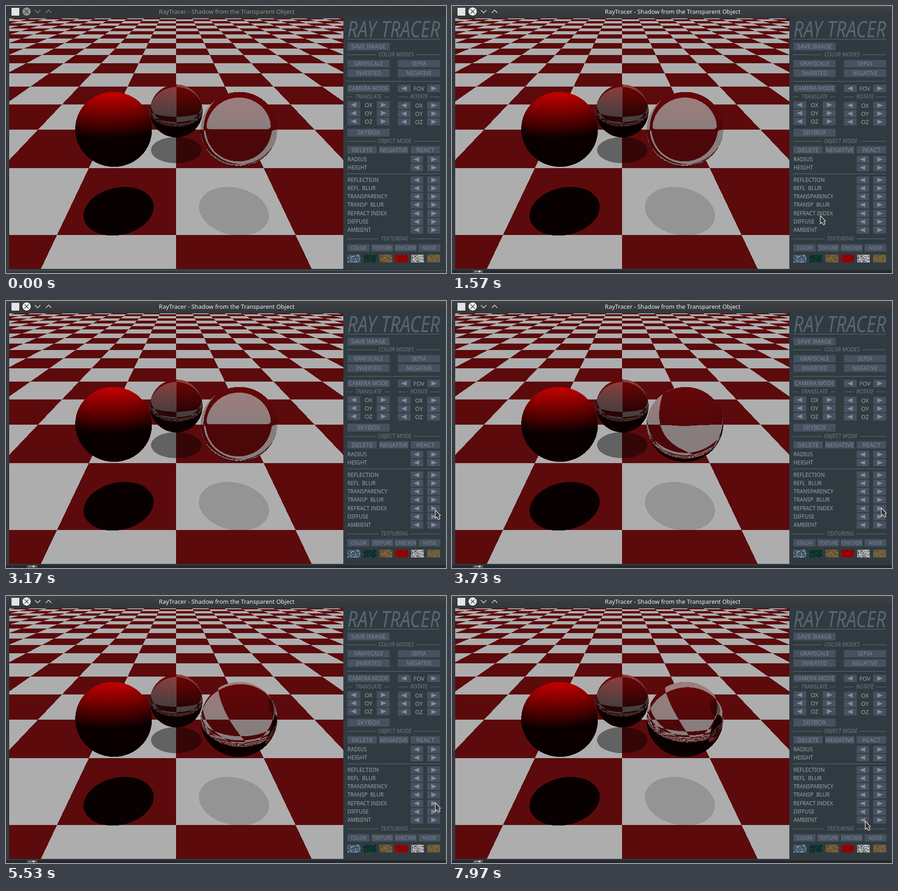
An HTML page with a canvas that plays this animation: 960x583 px, repeating every 8000 ms.

```html
<!DOCTYPE html>
<html lang="en">
<head>
<meta charset="utf-8">
<title>Ray tracer</title>
<style>
html, body { margin: 0; width: 100%; height: 100%; overflow: hidden; background: #31373c; }
canvas { display: block; }
</style>
</head>
<body>
<canvas id="stage" width="960" height="583"></canvas>
<script>
const LOOP = 8000, FONT = '"Noto Sans", "Open Sans", sans-serif';
const stage = document.getElementById('stage').getContext('2d');

function layer(w, h) {
  const c = document.createElement('canvas');
  c.width = w;
  c.height = h;
  return c.getContext('2d');
}

// ---- Ray-traced scene: unit floor tiles, parallel light, one radius for all balls ----
const R = 0.321, FOCAL = 626.5, COS = 0.8745, SIN = 0.4851;
const EYE = [0, 1.8384, -1.735], LIGHT = [0, 0.9724, 0.2334];
const balls = [
  { c: [-0.534, 0.738, 0.499], clear: 0, red: 185, shade: 0.1 },
  { c: [0, 0.473, 1.549], clear: 0.36, red: 70, shade: 0.567, index: 1.5 },
  { c: [0.534, 0.738, 0.499], clear: 0.72, red: 25, shade: 0.855, index: 1.1 }
];
const dot = (a, b) => a[0] * b[0] + a[1] * b[1] + a[2] * b[2];
const along = (p, d, t) => [p[0] + d[0] * t, p[1] + d[1] * t, p[2] + d[2] * t];

function bend(d, n, k) {
  const c = -dot(d, n);
  const m = k * c - Math.sqrt(Math.max(0, 1 - k * k * (1 - c * c)));
  return [d[0] * k + n[0] * m, d[1] * k + n[1] * m, d[2] * k + n[2] * m];
}

function floorColor(p, d) {
  if (d[1] >= -1e-6) return [0, 0, 0];
  const at = along(p, d, -p[1] / d[1]);
  let k = 1;
  for (const s of balls) {
    const o = along(s.c, at, -1), b = dot(o, LIGHT);
    if (dot(o, o) - b * b < R * R) k *= s.shade;
  }
  const white = (Math.floor(at[0]) + Math.floor(at[2])) % 2 === 0;
  return white ? [173 * k, 173 * k, 173 * k] : [92 * k, 10 * k, 12 * k];
}

function trace(p, d, depth, from) {
  let near = Infinity, ball = null;
  for (const s of balls) {
    if (s === from) continue;
    const o = along(p, s.c, -1), b = dot(o, d), q = b * b - dot(o, o) + R * R;
    const t = -b - Math.sqrt(q);
    if (q > 0 && t > 0 && t < near) { near = t; ball = s; }
  }
  if (!ball) return floorColor(p, d);
  const hit = along(p, d, near);
  const n = along(hit, ball.c, -1).map(v => v / R);
  const glow = 10 + ball.red * Math.max(0, dot(n, LIGHT));
  if (!ball.clear || !depth) return [glow, 0, 0];
  const inside = bend(d, n, 1 / ball.index);
  const out = along(hit, inside, -2 * R * dot(inside, n));
  const n2 = along(out, ball.c, -1).map(v => -v / R);
  const seen = trace(out, bend(inside, n2, ball.index), depth - 1, ball);
  return [seen[0] * ball.clear + glow, seen[1] * ball.clear, seen[2] * ball.clear];
}

function render(ctx, x0, y0, w, h, ox, oy) {
  const img = ctx.createImageData(w, h);
  for (let j = 0, i = 0; j < h; j++) {
    for (let k = 0; k < w; k++, i += 4) {
      const u = (x0 + k + 0.5 - 371.5) / FOCAL, v = (300.5 - y0 - j - 0.5) / FOCAL;
      const len = Math.sqrt(1 + u * u + v * v);
      const c = trace(EYE, [u / len, (v * COS - SIN) / len, (COS + v * SIN) / len], 3);
      img.data[i] = c[0];
      img.data[i + 1] = c[1];
      img.data[i + 2] = c[2];
      img.data[i + 3] = 255;
    }
  }
  ctx.putImageData(img, ox, oy);
}

// ---- Side panel ----
const BUTTON = '#47515f', INK = '#7f8996', LABEL = '#9aa4ad', DIM = '#6d7883';

function text(g, s, x, y, size, color, align = 'center', style = '') {
  g.font = `${style} ${size}px ${FONT}`;
  g.fillStyle = color;
  g.textAlign = align;
  g.textBaseline = 'alphabetic';
  g.fillText(s, x, y + size * 0.36);
}
function rect(g, x, y, w, h, color) {
  g.fillStyle = color;
  g.fillRect(x, y, w, h);
}
function button(g, s, x, y, w, size, h = 16) {
  rect(g, x, y, w, h, BUTTON);
  text(g, s, x + w / 2, y + h / 2, size, INK);
}
function arrow(g, x, y, dir, w = 28) {
  rect(g, x, y, w, 16, BUTTON);
  const c = x + w / 2;
  g.fillStyle = '#818b99';
  g.beginPath();
  g.moveTo(c + 7 * dir, y + 8);
  g.lineTo(c - 5 * dir, y + 3);
  g.lineTo(c - 5 * dir, y + 13);
  g.fill();
}
function spinner(g, s, x, y) {
  arrow(g, x, y - 8, -1);
  arrow(g, x + 64, y - 8, 1);
  text(g, s, x + 46, y, 12.6, LABEL);
}
function rule(g, x1, x2, y) {
  rect(g, x1, y, x2 - x1, 1, '#626c74');
}
function heading(g, s, y, x1, a, b, x2) {
  rule(g, x1, a, y);
  rule(g, b, x2, y);
  text(g, s, (a + b) / 2, y, 11.8, DIM, 'center', 'italic 300');
}
function swatch(g, x, colors, seed, grain) {
  rect(g, x, 543, 28, 17, colors[0]);
  for (let i = 0; i < 190; i++) {
    seed = seed * 16807 % 2147483647;
    const px = seed % 28, py = (seed >> 8) % 17;
    rect(g, x + px, 543 + py, Math.min(grain, 28 - px), 1, colors[1 + i % (colors.length - 1)]);
  }
}

function drawPanel(g) {
  rect(g, 0, 0, 960, 583, '#31383d');
  rect(g, 736, 27, 221, 547, '#303b41');
  g.save();
  g.translate(846, 50);
  g.scale(0.8, 1);
  text(g, 'RAY TRACER', 0, 0, 49, '#596570', 'center', 'italic 300');
  g.restore();
  rule(g, 744, 947, 72);
  button(g, 'SAVE IMAGE', 745, 80, 92, 13.3, 17);
  heading(g, 'COLOR MODES', 106, 744, 807, 895, 947);
  button(g, 'GRAYSCALE', 745, 118, 92, 11.8);
  button(g, 'SEPIA', 855, 118, 92, 11.8);
  button(g, 'INVERTED', 745, 138, 92, 11.8, 17);
  button(g, 'NEGATIVE', 855, 138, 92, 11.8, 17);
  rule(g, 744, 947, 164);
  button(g, 'CAMERA MODE', 745, 172, 92, 12);
  spinner(g, 'FOV', 855, 180);
  heading(g, 'TRANSLATE', 198, 744, 756, 826, 837);
  heading(g, 'ROTATE', 198, 855, 877, 925, 947);
  ['OX', 'OY', 'OZ'].forEach((s, i) => {
    spinner(g, s, 745, 216 + i * 18.3 | 0);
    spinner(g, s, 855, 217 + i * 18.3 | 0);
  });
  button(g, 'SKYBOX', 745, 268, 92, 13.5, 17);
  heading(g, 'OBJECT MODE', 295, 744, 807, 889, 947);
  button(g, 'DELETE', 745, 306, 64, 13.3);
  button(g, 'NEGATIVE', 814, 306, 64, 13.3);
  button(g, 'REACT', 883, 306, 64, 13.3);
  rule(g, 744, 947, 366);
  const row = (s, y) => {
    text(g, s, 745, y, 11.7, LABEL, 'left');
    arrow(g, 883, y - 8, -1, 27);
    arrow(g, 919, y - 8, 1);
  };
  row('RADIUS', 335);
  row('HEIGHT', 353);
  ['REFLECTION', 'REFL  BLUR', 'TRANSPARENCY', 'TRANSP  BLUR', 'REFRACT INDEX', 'DIFFUSE', 'AMBIENT']
    .forEach((s, i) => row(s, Math.round(380 + i * 18.15)));
  heading(g, 'TEXTURING', 508, 744, 812, 883, 947);
  ['COLOR', 'TEXTURE', 'CHECKER', 'NOISE']
    .forEach((s, i) => button(g, s, Math.round(745 + i * 51.6), 520, 48, 10.2));
  [
    [['#4c6176', '#1d2a36', '#a9b7c3', '#34495e', '#71889c'], 2],
    [['#10362f', '#08231f', '#1b4a3f', '#0c2c27'], 2],
    [['#6b532f', '#7a6139', '#5a4525', '#806840'], 7],
    [['#940404', '#700000', '#b00808', '#840000'], 2],
    [['#9a9a9a', '#c8c8c8', '#3c3c3c', '#dadada'], 2],
    [['#6f5d3a', '#7c6a45', '#62512f'], 3]
  ].forEach(([colors, grain], i) => swatch(g, Math.round(745 + i * 34.8), colors, 1234 + i * 777, grain));
}

// ---- Window frame ----
function chevron(g, x, dir, color) {
  g.strokeStyle = color;
  g.lineWidth = 1.3;
  g.beginPath();
  g.moveTo(x - 6, 12 - 3 * dir);
  g.lineTo(x, 12 + 3 * dir);
  g.lineTo(x + 6, 12 - 3 * dir);
  g.stroke();
}
function drawFrame(g, active) {
  const tone = k => `rgb(${k},${k + 1},${k + 2})`;
  const ink = tone(Math.round(147 + 92 * active));
  const bar = g.createLinearGradient(0, 0, 0, 27);
  bar.addColorStop(0, tone(Math.round(52 + 11 * active)));
  bar.addColorStop(1, '#31373c');
  rect(g, 0, 0, 960, 27, bar);
  rect(g, 12, 4, 17, 17, '#e4e4e4');
  g.fillStyle = ink;
  g.beginPath();
  g.arc(45, 12, 9, 0, 7);
  g.fill();
  g.strokeStyle = '#30363b';
  g.lineWidth = 1.3;
  g.beginPath();
  g.moveTo(40.5, 7.5);
  g.lineTo(49.5, 16.5);
  g.moveTo(49.5, 7.5);
  g.lineTo(40.5, 16.5);
  g.stroke();
  chevron(g, 69, 1, ink);
  chevron(g, 93, -1, ink);
  text(g, 'RayTracer - Shadow from the Transparent Object', 481.5, 12.5, 13, ink);
  rect(g, 0, 577, 958, 1, '#5c6367');
  rect(g, 957, 27, 1, 550, '#3f474c');
  rect(g, 3, 27, 1, 550, '#3f474c');
  g.globalAlpha = active;
  rect(g, 0, 577, 960, 6, '#24292d');
  rect(g, 14, 578, 1, 5, '#40464a');
  rect(g, 46, 577, 22, 6, '#50565a');
  rect(g, 50, 579, 5, 1, '#d5d7d8');
  g.fillStyle = '#e6e6e6';
  g.beginPath();
  g.moveTo(56, 578);
  g.lineTo(64, 578);
  g.lineTo(60, 582);
  g.fill();
  g.globalAlpha = 1;
}

// ---- Pointer ----
const pointer = new Path2D('M.5 .5V18.5L4 15.5L7.5 21L11 19L8.5 14L12 12.5Z');
const path = [
  [330, 640, 583], [830, 803, 457], [1670, 803, 457], [1900, 503, 248], [1940, 503, 248],
  [2200, 936, 458], [3130, 936, 458], [3170, 936, 456], [3330, 936, 455], [3470, 936, 452],
  [3730, 936, 451], [7200, 936, 451], [7230, 935, 450], [7970, 901, 491]
];
function drawPointer(g, t) {
  if (t < path[0][0]) return;
  let i = 1;
  while (i < path.length - 1 && path[i][0] < t) i++;
  const [t0, x0, y0] = path[i - 1], [t1, x1, y1] = path[i];
  const u = Math.min(1, (t - t0) / (t1 - t0)), e = u * u * (3 - 2 * u);
  g.save();
  g.translate(Math.round(x0 + (x1 - x0) * e), Math.round(y0 + (y1 - y0) * e));
  g.fillStyle = '#3b3533';
  g.strokeStyle = '#eeeeee';
  g.lineWidth = 1.2;
  g.fill(pointer);
  g.stroke(pointer);
  g.restore();
}

// Each press raises the refraction index of the right ball by 0.1.
const presses = [3400, 4530, 5530, 6350, 7290];
const base = layer(960, 583);
drawPanel(base);
render(base, 7, 27, 729, 547, 7, 27);
const views = [0, ...presses].map((_, i) => {
  const view = layer(170, 168);
  balls[2].index = 1.1 + 0.1 * i;
  render(view, 424, 186, 170, 168, 0, 0);
  return view.canvas;
});

function frame() {
  const t = performance.now() % LOOP;
  stage.drawImage(base.canvas, 0, 0);
  stage.drawImage(views[presses.filter(p => t >= p).length], 424, 186);
  drawFrame(stage, Math.max(0, Math.min(1, (t - 330) / 150)));
  drawPointer(stage, t);
  requestAnimationFrame(frame);
}
frame();
</script>
</body>
</html>
```
